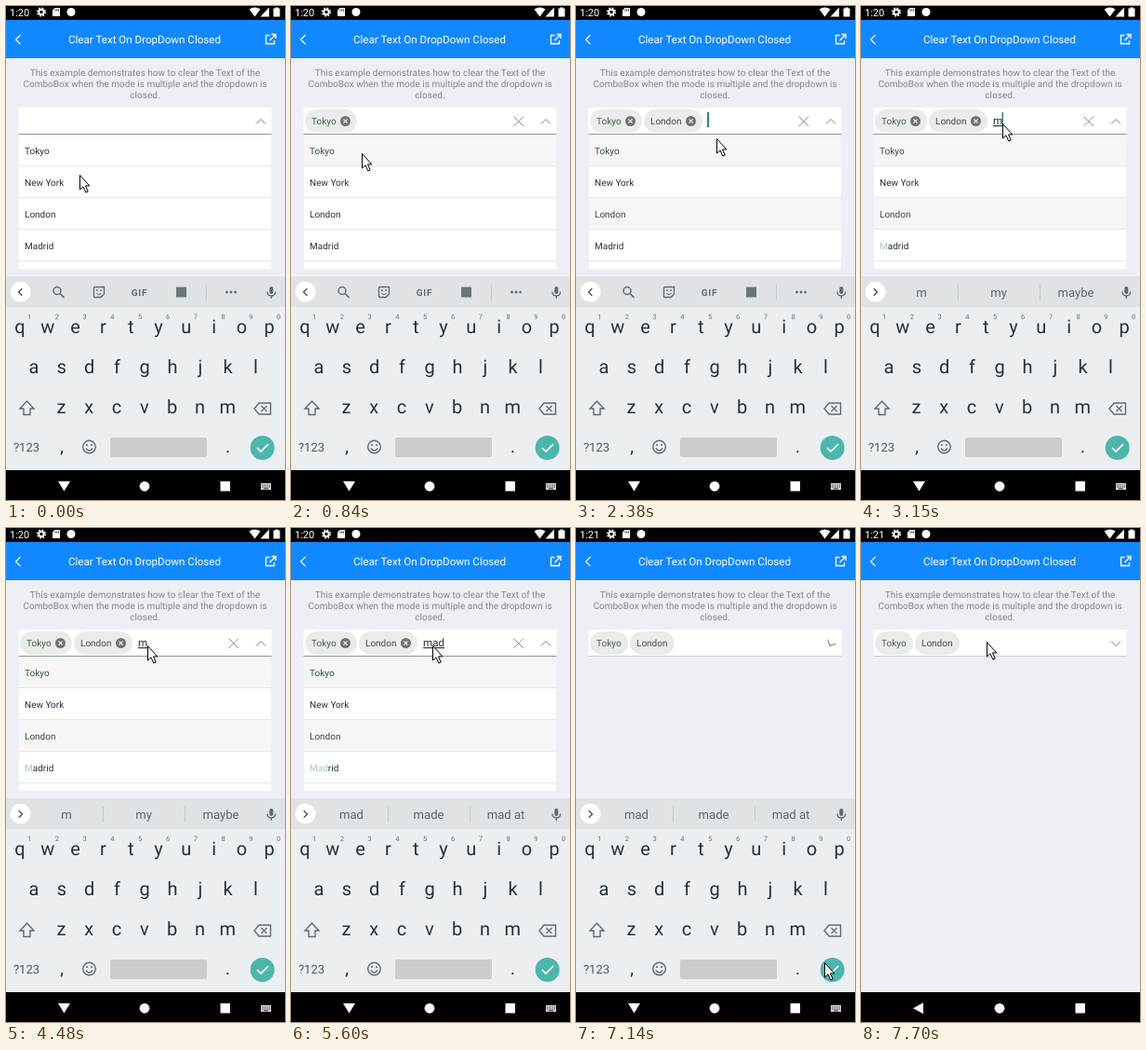
Write an HTML page that moves like this. It is 300 px wide and 530 px high and loops after 8000 ms.

```html
<!DOCTYPE html>
<html lang="en">
<head>
<meta charset="utf-8">
<title>Clear Text On DropDown Closed</title>
<style>
html, body { margin: 0; height: 100%; overflow: hidden; background: #eeeff4; }
svg { display: block; width: 100vw; height: 100vh; font-family: Roboto, sans-serif; text-rendering: geometricPrecision; }
</style>
</head>
<body>
<svg id="stage" viewBox="0 0 300 530"></svg>
<script>
const LOOP = 8000, STEP = 70;
const stage = document.getElementById('stage');

// Markup helpers
const text = (x, y, s, size, fill, more = '') =>
  `<text x="${x}" y="${y}" font-size="${size}" fill="${fill}" ${more}>${s}</text>`;
const mid = (x, y, s, size, fill, more = '') =>
  text(x, y, s, size, fill, 'text-anchor="middle" ' + more);
const rect = (x, y, w, h, fill, more = '') =>
  `<rect x="${x}" y="${y}" width="${w}" height="${h}" fill="${fill}" ${more}/>`;
const dot = (x, y, r, fill, more = '') =>
  `<circle cx="${x}" cy="${y}" r="${r}" fill="${fill}" ${more}/>`;
const line = (d, color, w = 1, more = '') =>
  `<path d="${d}" fill="none" stroke="${color}" stroke-width="${w}" ${more}/>`;
const shape = (d, fill, more = '') => `<path d="${d}" fill="${fill}" ${more}/>`;
const group = (id, body) => `<g id="${id}">${body}</g>`;

const INK = '#263238', GREEN = '#2f5233', ICON = '#5f6b71', KEYS = '#eceff1';

function statusBar() {
  return rect(0, 0, 300, 15, '#000') +
    text(4, 11, '<tspan id="clock">1:20</tspan>', 11, '#fff') +
    dot(38, 6.5, 2.7, 'none', 'stroke="#fff" stroke-width="2"') +
    dot(38, 6.5, 4.3, 'none', 'stroke="#fff" stroke-width="1.6" stroke-dasharray="1.7 1.68"') +
    shape('M52.5 2H58V11H50V4.5Z', '#fff') +
    line('M53 3.5V5.5M54.8 3.5V5.5M56.5 3.5V5.5', '#000', .8) +
    dot(70, 6.5, 4.5, '#fff') +
    shape('M261.5 3.5Q267.5 -.5 273.5 3.5L267.5 11.5Z', '#fff') +
    shape('M283 1.5V11.5H273.5Z', '#fff') +
    shape('M289.5 1.5H292.5V2.5H294.5V11.5H287.5V2.5H289.5Z', '#fff');
}

function header() {
  return rect(0, 15, 300, 41, '#1188ff') +
    line('M15.5 31L10.5 36L15.5 41', '#fff', 1.1) +
    mid(149, 40.3, 'Clear Text On DropDown Closed', 11.6, '#fff') +
    line('M283.5 31.5H279.5V40.5H288.5V37M285.5 30.5H290V35M290 30.5L283.5 37', '#fff', 1.3) +
    ['This example demonstrates how to clear the Text of the',
     'ComboBox when the mode is multiple and the dropdown is',
     'closed.'].map((s, i) => mid(149.5, 75 + i * 12, s, 10.05, '#85868a')).join('');
}

function chip(id, label, color) {
  return group(id,
    rect(0, 111, 10, 25, '#ebebeb', 'rx="12.5"') +
    text(7, 127.3, label, 10, color) +
    `<g class="remove">${dot(0, 123.5, 5.5, '#707372')}` +
    line('M-2 121.5L2 125.5M2 121.5L-2 125.5', '#ebebeb', 1.1) + '</g>');
}

function field() {
  return rect(13.5, 109, 272, 28, '#fff') +
    rect(13.5, 137, 272, 1, '#8b9896', 'id="underline"') +
    chip('tokyo', 'Tokyo', '#3d6340') + chip('london', 'London', '#414a44') +
    text(142, 127, '', 11.6, INK, 'id="typed"') +
    rect(141, 114, 2, 16, '#2f8468', 'id="caret"') +
    group('clear', line('M239.5 118.5L250 129M250 118.5L239.5 129', '#85898b')) +
    group('arrow', line('M-5 2.5L0 -2.5L5 2.5', '#777b7d'));
}

function list() {
  const names = ['Tokyo', 'New York', 'London', '<tspan id="hit" fill="#a3c9bf"></tspan><tspan id="rest">Madrid</tspan>'];
  return group('list', rect(14, 138, 271, 144, '#fff') +
    names.map((s, i) => {
      const y = 138 + i * 34;
      return rect(14, y, 271, 33, '#fff', `id="row${i}"`) +
        rect(14, y + 33, 271, 1, '#e6e7e8') +
        text(20, y + 21, s, 10, INK, `id="name${i}"`);
    }).join(''));
}

function toolbar() {
  return group('tools',
    dot(55, 305.5, 4, 'none', `stroke="${ICON}" stroke-width="1.5"`) +
    line('M58 308.5L62.5 313', ICON, 1.7) +
    line('M95.5 301.5H105.5V309L102 312.5H95.5Q94.5 312.5 94.5 311.5V302.5Q94.5 301.5 95.5 301.5', ICON, 1.3) +
    line('M97.5 308Q100 311 102.5 308', ICON, 1.1) +
    dot(98, 305, .9, ICON) + dot(102, 305, .9, ICON) +
    mid(143.5, 310.8, 'GIF', 10, ICON, 'font-weight="700" letter-spacing=".8"') +
    rect(183, 301.5, 11, 11, '#6b767b') +
    rect(215, 299, 1, 17, '#c5cbce') +
    [237.5, 242, 246.5].map(x => dot(x, 307, 1.4, ICON)).join(''));
}

function keyRow(letters, x0, y) {
  return [...letters].map((c, i) => mid(x0 + i * 29.8, y, c, 20, INK)).join('');
}

function keyboard() {
  const digits = [...'1234567890'].map((c, i) => mid(25 + i * 29.8, 336, c, 7.5, '#68757a')).join('');
  return group('keyboard',
    rect(0, 290, 300, 33, '#dfe3e6') + rect(0, 323, 300, 176, KEYS) +
    dot(15.5, 307.3, 11, '#cdd2d4') + dot(15.5, 306.8, 11, '#fff') +
    group('chevron', line('M1.8 -3.8L-2 0L1.8 3.8', '#4a565b', 1.4)) +
    toolbar() +
    group('hints', rect(104, 299, 1, 17, '#c5cbce') + rect(192, 299, 1, 17, '#c5cbce') +
      [65, 148, 231].map((x, i) => mid(x, 312, '', 13.1, '#5b676c', `id="hint${i}"`)).join('')) +
    rect(283.3, 301, 4, 8, ICON, 'rx="2"') +
    line('M281 306.5Q281 311 285.3 311Q289.6 311 289.6 306.5M285.3 311V314', ICON, 1.3) +
    digits + keyRow('qwertyuiop', 15, 351) + keyRow('asdfghjkl', 30, 394) + keyRow('zxcvbnm', 59.5, 437) +
    line('M22.5 424L30 432H26V438.5H19V432H15Z', ICON, 1.4) +
    line('M272 426H284.5V438H272L267 432ZM274.5 429L280.5 435M280.5 429L274.5 435', ICON, 1.4) +
    mid(22, 478, '?123', 13, '#4a565b') + mid(60, 479, ',', 19, INK) + mid(238.5, 479, '.', 19, INK) +
    dot(89.5, 473, 6.8, 'none', `stroke="${ICON}" stroke-width="1.4"`) +
    dot(87, 471, 1.1, ICON) + dot(92, 471, 1.1, ICON) +
    line('M85.8 474.5Q89.5 479.5 93.2 474.5', ICON, 1.3) +
    rect(112, 463, 104, 21, '#c9cdcf', 'rx="2"') +
    dot(275.7, 474, 13, '#4db6ac') +
    line('M270 474L274 478L282 470', '#fff', 1.7));
}

function navBar() {
  return rect(0, 498, 300, 32, '#000') +
    shape('', '#fff', 'id="back"') + dot(149, 515.3, 5.4, '#fff') + rect(230.5, 510, 10.5, 10.5, '#fff') +
    group('switcher', rect(274, 512, 11, 7, '#d8d8d8') +
      line('M275 514H284M275 516H284', '#000', .9, 'stroke-dasharray="1 1"') +
      line('M277 517.8H282', '#000', .8));
}

stage.innerHTML = rect(0, 0, 300, 530, '#eeeff4') + statusBar() + header() + field() + list() + keyboard() + navBar() +
  group('pointer', shape('M.5 .5V16L4 12.8L6.8 19L9.2 18L6.5 11.9H10.8Z', '#fff',
    'stroke="#000" stroke-width="1" stroke-linejoin="round"'));

const el = {};
stage.querySelectorAll('[id]').forEach(n => el[n.id] = n);
const set = (id, name, v) => el[id].setAttribute(name, v);
const show = (id, on) => set(id, 'visibility', on ? 'visible' : 'hidden');
const put = (id, s) => { if (el[id].textContent !== s) el[id].textContent = s; };
const ramp = (t, a, b) => Math.min(1, Math.max(0, (t - a) / (b - a)));
const ease = k => k * k * (3 - 2 * k);

// Pointer stops: time, x, y
const stops = [
  [0, 79, 181], [350, 70, 157], [770, 70, 157], [1050, 110, 164], [1470, 66, 206], [1680, 60, 219],
  [1820, 60, 219], [2380, 151, 142], [2450, 151, 142], [2660, 152, 126], [5740, 152, 126],
  [6230, 278, 408], [6300, 278, 408], [6580, 268, 475], [6860, 268, 475], [7070, 267, 466],
  [7210, 267, 466], [7700, 135, 122], [LOOP, 135, 122]
];
// Spans in which the text caret is lit
const lit = [[210, 560], [560, 840], [1190, 1680], [1890, 2520], [3080, 3570], [3990, 4480], [4760, 5600], [6090, 6510]];
const typing = [[3080, 'm', ['m', 'my', 'maybe']], [4760, 'ma', ['ma', 'may', 'make']], [5110, 'mad', ['mad', 'made', 'mad at']]];
const caretAt = { '': 141, m: 151.5, ma: 157.8, mad: 164.3 };

function movePointer(t) {
  const i = Math.max(1, stops.findIndex(s => s[0] > t));
  const [a, b] = [stops[i - 1], stops[i]];
  const k = ease(ramp(t, a[0], b[0]));
  set('pointer', 'transform', `translate(${Math.round(a[1] + (b[1] - a[1]) * k)} ${Math.round(a[2] + (b[2] - a[2]) * k)})`);
}

function placeChip(id, on, x, w, removable) {
  show(id, on);
  set(id, 'transform', `translate(${x} 0)`);
  el[id].firstChild.setAttribute('width', w);
  const mark = el[id].querySelector('.remove');
  mark.setAttribute('transform', `translate(${w - 12.5} 0)`);
  mark.style.display = removable ? '' : 'none';
}

function render(ms) {
  const t = ms - ms % STEP;
  const first = t >= 560, second = t >= 1890, closed = t >= 6930;

  put('clock', t < 6440 ? '1:20' : '1:21');
  movePointer(t);

  placeChip('tokyo', first, 15, closed ? 41 : 56, !closed);
  placeChip('london', second, closed ? 58 : 73, closed ? 48 : 63, !closed);
  show('clear', first && !closed);
  set('arrow', 'transform', `translate(274 124) rotate(${-180 * ramp(t, 6930, 7175)})`);
  set('underline', 'fill', closed ? '#cfd1d4' : '#8b9896');

  const entry = typing.filter(e => t >= e[0]).pop();
  const word = entry && t < 6860 ? entry[1] : '';
  put('typed', word);
  set('typed', 'text-decoration', 'underline');
  show('caret', lit.some(([a, b]) => t >= a && t < b));
  set('caret', 'x', second ? caretAt[word] : first ? 77 : 19);
  set('caret', 'width', word ? 1.5 : 2);

  [[0, first], [2, second]].forEach(([i, on]) => {
    set('row' + i, 'fill', on ? '#f6f6f6' : '#fff');
    set('name' + i, 'fill', on ? GREEN : INK);
  });
  put('hit', 'Madrid'.slice(0, word.length));
  put('rest', 'Madrid'.slice(word.length));
  set('list', 'opacity', 1 - ramp(t, 6860, 7070));

  show('tools', !entry);
  show('hints', !!entry);
  set('chevron', 'transform', `translate(15.5 307) scale(${entry ? -1 : 1} 1)`);
  // Suggestions follow the typed text one step later
  const hints = typing.filter((e, i) => t >= e[0] + (i ? STEP : 0)).pop();
  if (hints) hints[2].forEach((s, i) => put('hint' + i, s));

  const drop = ramp(t, 7140, 7420);
  set('keyboard', 'transform', `translate(0 ${208 * drop * drop})`);
  show('keyboard', drop < 1);
  show('switcher', drop === 0);
  set('back', 'd', drop ? 'M56 515.3L67 509.3V521.3Z' : 'M56 510H69L62.5 520.5Z');
}

const start = performance.now();
function tick() {
  render((performance.now() - start) % LOOP);
  requestAnimationFrame(tick);
}
tick();
</script>
</body>
</html>
```
